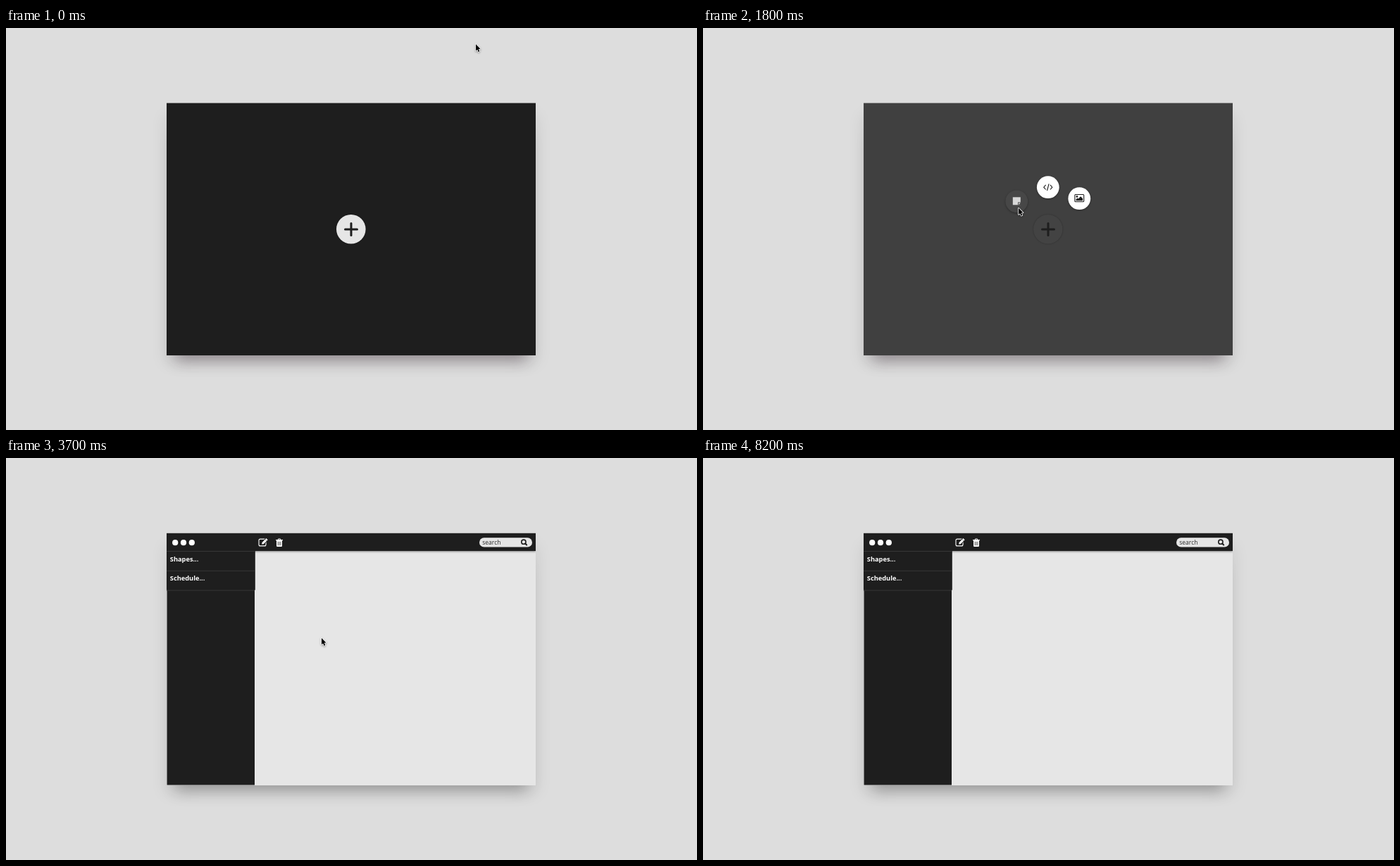
An HTML page with a canvas for the animation above (8300 ms loop, 981x571 px).

```html
<!DOCTYPE html>
<html lang="en">
<head>
<meta charset="utf-8">
<title>Notes board</title>
<style>
  html, body { margin: 0; width: 100%; height: 100%; overflow: hidden; background: #ddd; }
  canvas { display: block; }
</style>
</head>
<body>
<canvas id="stage" width="981" height="571"></canvas>
<script>
const W = 981, H = 571, LOOP = 8300, STEP = 100;
const DARK = '#1e1e1e', LIGHT = '#e6e6e6', BACK = '#ddd';
const CARD = { x: 228, y: 106.6, w: 524, h: 358.4 };
const HEAD = 132, SIDE = 353, ROW = 27.8;
const TAU = Math.PI * 2;

// When things happen, in ms
const OPEN = 1000, PICK = 1600, FADE = 3400, LEAVE = 7700, GONE = 8200;

const stage = document.getElementById('stage').getContext('2d');
const layer = document.createElement('canvas');
layer.width = W;
layer.height = H;
const layerCtx = layer.getContext('2d');

const clamp = v => Math.min(1, Math.max(0, v));
const progress = (t, from, to) => clamp((t - from) / (to - from));
const mix = (a, b, k) => a + (b - a) * k;
const easeOut = k => 1 - (1 - k) ** 2;
const easeInOut = k => k * k * (3 - 2 * k);
const gray = v => `rgb(${[v, v, v].map(Math.round)})`;

// The pointer swings in to the plus, slides to the note button, then leaves
function pointerAt(t) {
  const reach = easeInOut(progress(t, 100, 600));
  const slide = easeOut(progress(t, PICK - STEP, PICK + 2 * STEP));
  const exit = progress(t, LEAVE, GONE - STEP) ** 1.3;
  const bow = 45 * Math.sin(Math.PI * reach);
  const x = mix(mix(667, 482, reach) - bow, 448, slide);
  const y = mix(mix(23, 285, reach), 255.7, slide);
  return [mix(x, 58, exit), mix(y, 32, exit)];
}

function disc(c, x, y, r, fill) {
  c.fillStyle = fill;
  c.beginPath();
  c.arc(x, y, r, 0, TAU);
  c.fill();
}

function poly(c, pts, closed) {
  c.beginPath();
  pts.forEach(([x, y]) => c.lineTo(x, y));
  if (closed) c.closePath();
}

function line(c, pts, color, width, cap = 'butt') {
  c.strokeStyle = color;
  c.lineWidth = width;
  c.lineCap = cap;
  poly(c, pts);
  c.stroke();
}

function pill(c, x, y, w, h, r) {
  c.beginPath();
  c.roundRect(x, y, w, h, r);
}

function withShadow(c, color, blur, dy, draw) {
  c.save();
  c.shadowColor = color;
  c.shadowBlur = blur;
  c.shadowOffsetY = dy;
  draw();
  c.restore();
}

function drawCard(c, fill, shade) {
  const { x, y, w, h } = CARD;
  c.fillStyle = fill;
  withShadow(c, 'rgba(0,0,0,.1)', 22, 10, () => c.fillRect(x, y + 8, w, h - 8));
  withShadow(c, shade, 20, 10, () => c.fillRect(x + 14, y + 40, w - 28, h - 43));
  c.fillRect(x, y, w, h);
}

function noteIcon(c, fill, paper) {
  c.fillStyle = fill;
  c.fillRect(-5.5, -6, 11, 11);
  c.fillStyle = paper;
  c.fillRect(1.7, 1.2, 4, 4);
  c.fillStyle = fill;
  poly(c, [[2.6, 2.1], [5.5, 2.1], [2.6, 5]], true);
  c.fill();
}

function codeIcon(c) {
  for (const s of [-1, 1]) line(c, [[3.2 * s, -3.3], [6 * s, 0], [3.2 * s, 3.3]], DARK, 1.1);
  line(c, [[1.3, -4.8], [-1.3, 4.8]], DARK, 1.1);
}

function imageIcon(c) {
  c.strokeStyle = DARK;
  c.lineWidth = 1.1;
  pill(c, -6.4, -5.7, 12.8, 10.2, 1);
  c.stroke();
  disc(c, -3.4, -2.8, 1.3, DARK);
  poly(c, [[-4.8, 3], [-4.8, 1.3], [-2.7, -.8], [-1.5, .4], [1.8, -3], [4.8, 0], [4.8, 3]], true);
  c.fill();
}

function drawItem(c, x, y, size, fill, icon) {
  c.save();
  c.translate(x, y);
  c.scale(size, size);
  c.globalAlpha = size;
  withShadow(c, 'rgba(0,0,0,.35)', 3, 1, () => disc(c, 0, 0, 15.9, fill));
  icon(c);
  c.restore();
}

function drawHome(c, t) {
  const step = Math.round(3 * progress(t, PICK, PICK + 3 * STEP));
  const flash = [0, .12, 1, 0][step];
  const picked = [0, .07, .82, 1][step];
  drawCard(c, gray(30 + 34 * Math.sqrt(flash)), 'rgba(40,20,32,.36)');

  const plus = gray(230 - 163 * flash);
  withShadow(c, 'rgba(0,0,0,.35)', 2, 0, () => disc(c, 489.8, 285.8, 20.8, plus));
  line(c, [[481.5, 286], [498.5, 286]], DARK, 3, 'round');
  line(c, [[490, 277.5], [490, 294.5]], DARK, 3, 'round');

  if (t < OPEN) return;
  const size = mix(.6, 1, progress(t, OPEN, OPEN + STEP));
  const paper = gray(mix(255, 30, picked)), ink = gray(mix(30, 255, picked));
  drawItem(c, 445.3, 246.3, size, paper, g => noteIcon(g, ink, paper));
  drawItem(c, 489.8, 226.2, size, '#fff', codeIcon);
  drawItem(c, 534.3, 242.2, size, '#fff', imageIcon);
}

function editIcon(c) {
  c.strokeStyle = '#fff';
  c.lineWidth = 1.1;
  pill(c, 359, 115.1, 10, 9.8, 2);
  c.stroke();
  // Pencil lying on its diagonal, cut out of the box
  c.save();
  c.translate(363.2, 122.5);
  c.rotate(-Math.PI / 4);
  poly(c, [[0, 0], [2, -1.5], [10.4, -1.5], [10.4, 1.5], [2, 1.5]], true);
  c.strokeStyle = DARK;
  c.lineWidth = 1.8;
  c.stroke();
  c.fillStyle = '#fff';
  c.fill();
  line(c, [[8.2, -1.5], [8.2, 1.5]], DARK, .5);
  c.restore();
}

function trashIcon(c) {
  c.fillStyle = '#fff';
  c.fillRect(383, 116, 10, 1.2);
  pill(c, 384, 117, 8, 9, [0, 0, 1.3, 1.3]);
  c.fill();
  line(c, [[386, 116.4], [386.6, 114.9], [389.4, 114.9], [390, 116.4]], '#fff', 1);
  for (let i = -1; i < 2; i++) line(c, [[388 + 1.9 * i, 118.8], [388 + 1.9 * i, 124.2]], DARK, .7);
}

function searchBox(c) {
  c.fillStyle = LIGHT;
  pill(c, 672, 113.3, 75, 13.2, 6.6);
  c.fill();
  c.strokeStyle = DARK;
  c.lineWidth = 1.6;
  c.beginPath();
  c.arc(734.9, 119.2, 3.1, 0, TAU);
  c.stroke();
  line(c, [[737.2, 121.5], [739.2, 123.5]], DARK, 1.9, 'round');
  c.fillStyle = '#2a2a2a';
  c.font = '8.5px "Open Sans", "Noto Sans", sans-serif';
  c.fillText('search', 676.3, 122.6);
}

function drawEditor(c) {
  const { x, y, w, h } = CARD, bottom = y + h;
  drawCard(c, LIGHT, 'rgba(0,0,0,.25)');
  c.save();
  c.beginPath();
  c.rect(x, y, w, h);
  c.clip();
  c.fillStyle = DARK;
  c.fillRect(x + .5, HEAD, SIDE - x - .5, bottom - HEAD - .5);
  withShadow(c, 'rgba(0,0,0,.6)', 3, 1, () => c.fillRect(x, y, w, HEAD - y));
  c.restore();

  c.fillStyle = DARK;
  c.fillRect(x, HEAD, SIDE - x + .8, 2 * ROW);
  for (let i = 0; i < 3; i++) {
    line(c, [[x, HEAD + .5 + i * ROW], [SIDE, HEAD + .5 + i * ROW]], '#363636', 1);
    disc(c, 240.2 + 11.8 * i, 120.2, 4.1, '#fff');
  }
  editIcon(c);
  trashIcon(c);
  searchBox(c);

  c.fillStyle = '#fff';
  c.font = 'bold 9.25px "Open Sans", "Noto Sans", sans-serif';
  ['Shapes...', 'Schedule...'].forEach((s, i) => c.fillText(s, 232.8, 147 + 27.2 * i));
}

function drawPointer(c, [x, y]) {
  c.save();
  c.translate(x, y);
  poly(c, [[0, 0], [0, 9.4], [2.1, 7.5], [3.7, 11], [5.3, 10.3], [3.8, 6.9], [6.6, 6.7]], true);
  c.strokeStyle = '#fff';
  c.lineWidth = 1.5;
  c.lineJoin = 'round';
  withShadow(c, 'rgba(0,0,0,.4)', 2.5, 1, () => c.stroke());
  c.fillStyle = '#000';
  c.fill();
  c.restore();
}

function clear(c) {
  c.fillStyle = BACK;
  c.fillRect(0, 0, W, H);
}

clear(layerCtx);
drawEditor(layerCtx);

function render(t) {
  clear(stage);
  drawHome(stage, t);
  stage.globalAlpha = progress(t, FADE - STEP, FADE + 3 * STEP);
  stage.drawImage(layer, 0, 0);
  stage.globalAlpha = 1;
  if (t < GONE) drawPointer(stage, pointerAt(t));
}

const start = performance.now();
function tick() {
  const t = (performance.now() - start) % LOOP;
  render(Math.floor(t / STEP) * STEP);
  requestAnimationFrame(tick);
}
tick();
</script>
</body>
</html>
```
